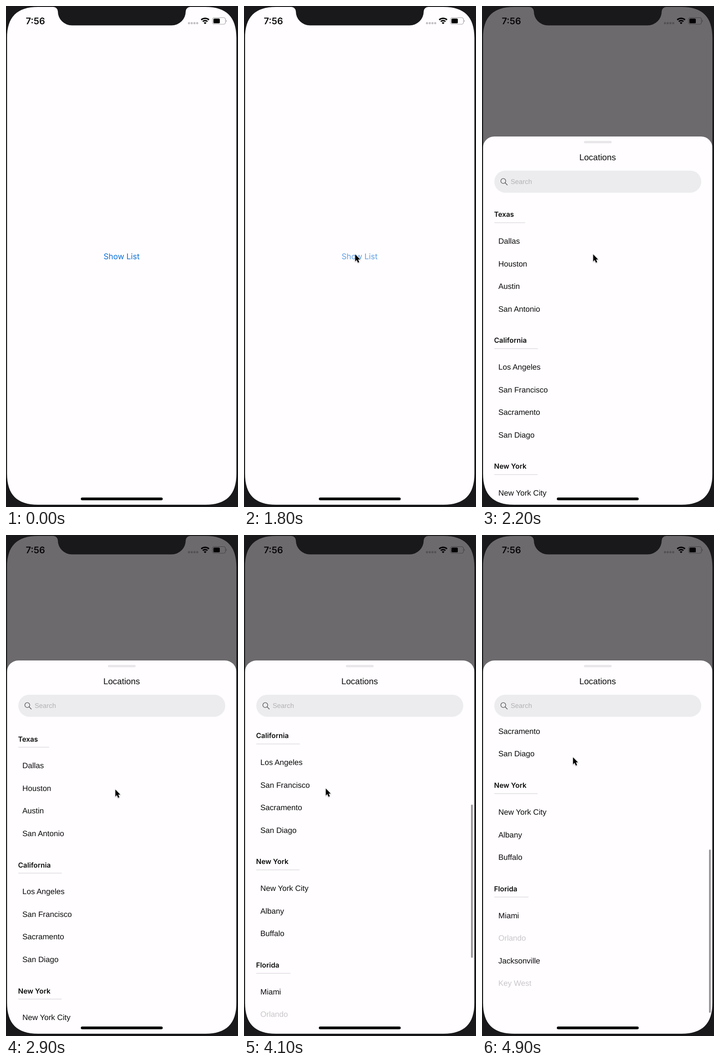
An HTML page for the animation above (5000 ms loop, 510 by 1098 pixels).

```html
<!DOCTYPE html>
<html lang="en">
<head>
<meta charset="utf-8">
<title>Locations sheet</title>
<style>
  html, body { margin: 0; width: 100%; height: 100%; overflow: hidden; background: #19181a; }
  svg { display: block; width: 100vw; height: 100vh; }
  text { font-family: "Liberation Sans", Arial, sans-serif; fill: #0c0b0c; text-rendering: geometricPrecision; }
  .ui { font-family: Inter, sans-serif; }
  .head { font-family: Inter, sans-serif; font-size: 15.4px; font-weight: 600; }
  .row { font-size: 17px; }
  .off { fill: #c8c6c9; }
  #pointer { filter: drop-shadow(0 1.5px 1px rgba(0, 0, 0, .3)); }
</style>
</head>
<body>
<svg viewBox="0 0 510 1098">
  <defs>
    <clipPath id="listClip"><rect y="124" width="510" height="980"/></clipPath>
  </defs>
  <rect width="510" height="1098" fill="#fffdff"/>

  <text class="ui" x="43.5" y="40" font-size="20" font-weight="600">7:56</text>
  <g id="dots" fill="#c3c1c5"></g>
  <g id="wifi" fill="none" stroke="#000" stroke-width="2.8">
    <path d="M434.6 36.6L437.7 39.8L440.8 36.6z" fill="#000" stroke="none"/>
  </g>
  <rect x="454" y="25.5" width="28.5" height="14.5" rx="4.2" fill="none" stroke="#a3a1a4" stroke-width="1.2"/>
  <rect x="456" y="27.4" width="14" height="10.7" rx="2.2"/>
  <path d="M484 30.5q2.2 2.2 0 4.6z" fill="#8d8b8e"/>

  <text id="button" class="ui" x="254" y="554.6" font-size="17.3" text-anchor="middle" style="fill:#0a70d8">Show List</text>
  <rect id="dim" width="510" height="1098" fill="#040006" opacity="0"/>

  <g id="sheet">
    <rect x="2" width="504.5" height="1100" rx="25" fill="#fffdff"/>
    <rect x="224" y="9.8" width="61" height="5" rx="2.5" fill="#e8e6e8"/>
    <g clip-path="url(#listClip)"><g id="list"></g></g>
    <text id="title" x="254.2" font-size="18.8" text-anchor="middle">Locations</text>
    <g id="field">
      <rect x="27" width="455" height="48.4" rx="24.2" fill="#ecebed"/>
      <path d="M50.6 26.6l5 5" stroke="#555356" stroke-width="1.4" stroke-linecap="round"/>
      <circle cx="46.8" cy="22.8" r="5.4" fill="none" stroke="#555356" stroke-width="1.3"/>
      <text id="hint" x="63" font-size="14.8" style="fill:#b3b1b4">Search</text>
    </g>
    <rect id="bar" x="499" width="4" rx="2" fill="#9a989b"/>
  </g>

  <rect x="164.5" y="1077.2" width="180" height="6" rx="3"/>
  <path id="bezel" fill="#19181a" fill-rule="evenodd"/>
  <path fill="#19181a" d="M104 0V2A10 10 0 0 1 114 12A31 30.5 0 0 0 145 42.5H364A31 30.5 0 0 0 395 12A10 10 0 0 1 405 2V0z"/>
  <path id="pointer" d="M.7 .8V16.2L4.2 13L6.7 19L9.5 17.8L7 12H11.6z" stroke="#fff" stroke-width="1.2" paint-order="stroke"/>
</svg>
<script>
const LOOP = 5000, STEP = 100, REST = 275, HIDDEN = 1098;
const $ = id => document.getElementById(id);

function set(el, attrs) {
  for (const k in attrs) el.setAttribute(k, attrs[k]);
  return el;
}
function add(parent, tag, attrs, text = '') {
  const el = set(document.createElementNS('http://www.w3.org/2000/svg', tag), attrs);
  el.textContent = text;
  return parent.appendChild(el);
}
const move = (id, x, y) => set($(id), { transform: `translate(${x} ${y})` });

// Progress from 0 to 1: straight, eased, and critically damped spring
const ramp = (t, from, to) => Math.max(0, Math.min(1, (t - from) / (to - from)));
function ease(t, from, to) {
  const u = ramp(t, from, to);
  return u * u * (3 - 2 * u);
}
function spring(t, from, rate) {
  const s = Math.max(0, t - from) * rate;
  return 1 - (1 + s) * Math.exp(-s);
}

// Screen outline with smooth corners
function screenPath(l, t, r, b) {
  const e = 68, k = 22;
  return `M0 0H510V1098H0zM${l + e} ${t}H${r - e}C${r - k} ${t} ${r} ${t + k} ${r} ${t + e}` +
    `V${b - e}C${r} ${b - k} ${r - k} ${b} ${r - e} ${b}H${l + e}` +
    `C${l + k} ${b} ${l} ${b - k} ${l} ${b - e}V${t + e}C${l} ${t + k} ${l + k} ${t} ${l + e} ${t}z`;
}
set($('bezel'), { d: screenPath(2.3, 2, 506.5, 1093) });

for (let i = 0; i < 4; i++) {
  add($('dots'), 'rect', { x: 400 + i * 6, y: 35.3, width: 4.6, height: 4.6, rx: 1.6 });
}
for (let r = 2.6; r < 13; r += 5) {
  const dx = r * Math.sin(.75), y = 39.6 - r * Math.cos(.75);
  add($('wifi'), 'path', { d: `M${437.7 - dx} ${y}A${r} ${r} 0 0 1 ${437.7 + dx} ${y}` });
}

const places = {
  'Texas': ['Dallas', 'Houston', 'Austin', 'San Antonio'],
  'California': ['Los Angeles', 'San Francisco', 'Sacramento', 'San Diago'],
  'New York': ['New York City', 'Albany', 'Buffalo'],
  'Florida': ['Miami', 'Orlando', 'Jacksonville', 'Key West']
};
const disabled = ['Orlando', 'Key West'];
const ROW = 49.4;
let y = 172.3;
for (const [name, rows] of Object.entries(places)) {
  const head = add($('list'), 'text', { class: 'head', x: 26.5, y: y + 5.2 }, name);
  add($('list'), 'rect', {
    x: 27, y: y + 17.2, width: head.getComputedTextLength() + 24, height: 1.1, fill: '#d3d1d4'
  });
  y += 58.1;
  for (const row of rows) {
    add($('list'), 'text', { class: disabled.includes(row) ? 'row off' : 'row', x: 36, y: y + 6 }, row);
    y += ROW;
  }
  y += 20.3;
}

function render(t) {
  // The sheet's contents settle along with its rise
  const left = 1 - spring(t, 1857, .0184);
  const scroll = 456.3 * spring(t, 3700, .00525);
  move('sheet', 0, REST + (HIDDEN - REST) * left);
  set($('title'), { y: 52.4 - 8 * left });
  move('field', 0, 75 - 15 * left);
  set($('hint'), { y: 29.2 - 23 * left });
  move('list', 0, -76 * left - scroll);
  set($('dim'), { opacity: .58 * ramp(t, 1868, 2198) });
  set($('button'), { opacity: t < 1600 ? 1 : .3 + .7 * ramp(t, 1700, 1900) });

  const top = 424 + .589 * scroll, bottom = 723 + .72 * scroll;
  set($('bar'), { y: top - REST, height: bottom - top, opacity: ramp(t, 3700, 3900) });

  // Reach the button, nudge, go down to the list, then drag it up
  const reach = ease(t, 400, 1000), nudge = ease(t, 1100, 1400), down = ease(t, 2800, 3600);
  move('pointer',
    348.5 - 108 * reach + 3.2 * nudge - 93.2 * down + 50 * spring(t, 3700, .0048),
    697.5 - 156 * reach + 2 * nudge + 315 * down - 372.5 * spring(t, 3700, .00775));
  set($('pointer'), { visibility: t < 200 ? 'hidden' : 'visible' });
}

const start = performance.now();
function tick() {
  const t = (performance.now() - start) % LOOP;
  render(Math.floor(t / STEP) * STEP);
  requestAnimationFrame(tick);
}
tick();
</script>
</body>
</html>
```
